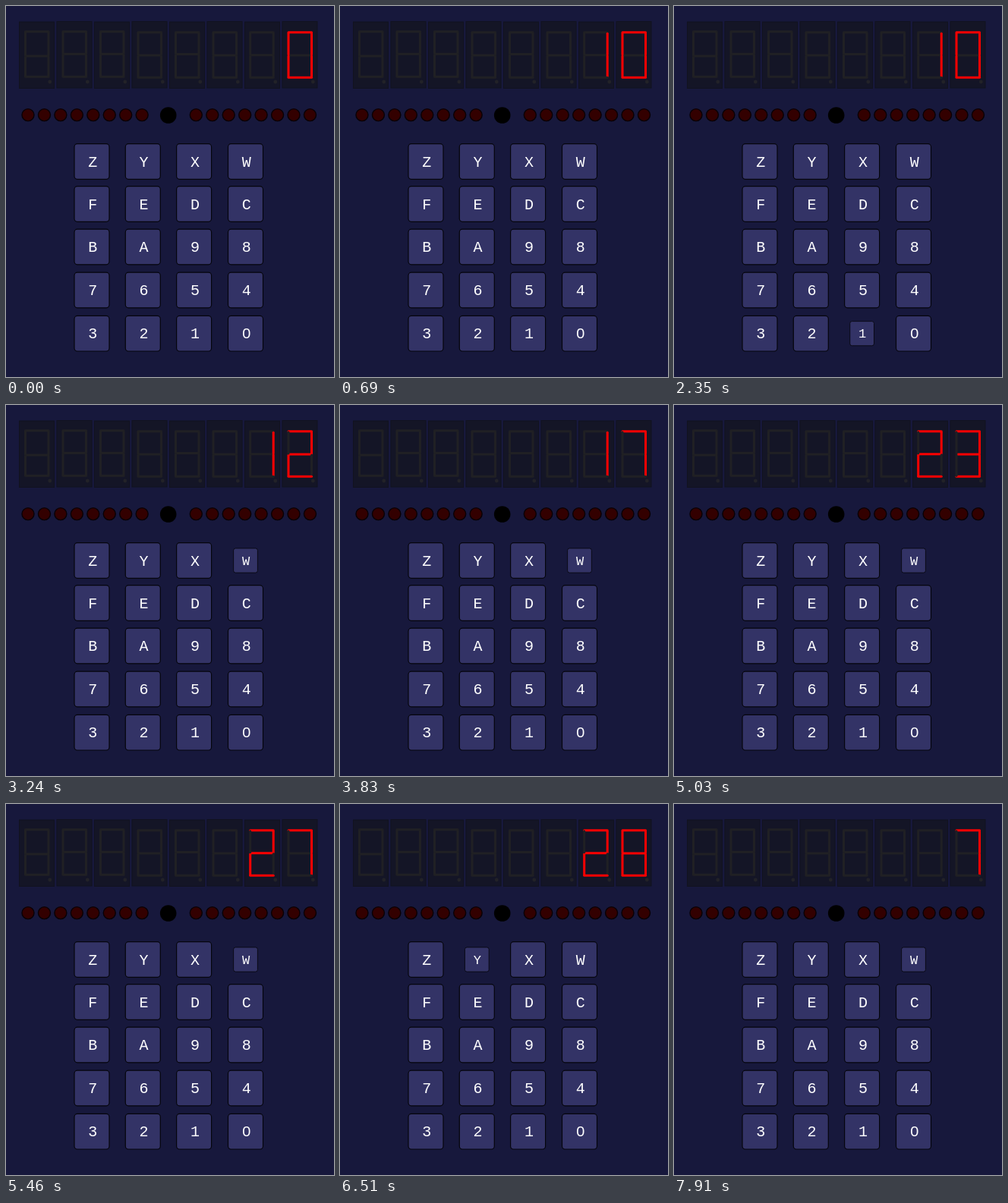
An HTML page for the animation above (7990 ms loop, 432 by 489 pixels).

```html
<!DOCTYPE html>
<html lang="en">
<head>
<meta charset="utf-8">
<title>Keypad adder</title>
<style>
  html, body { margin: 0; width: 100%; height: 100%; overflow: hidden; background: #17183c; }
  svg { display: block; width: 432px; height: 489px; }
  .panel { fill: #141526; stroke: #11121f; }
  .seg { stroke: #202024; stroke-width: 3; stroke-linecap: round; }
  .seg.on { stroke: #f00; }
  .dot { fill: #222228; }
  .led { fill: #300; stroke: #090005; stroke-width: 1.4; }
  .key rect { fill: #336; stroke: #05050c; stroke-width: 1.2; }
  .key text { fill: #fff; font: 20px "Courier New", "Liberation Mono", monospace; text-anchor: middle; }
  .key .hole { stroke: none; }
</style>
</head>
<body>
<svg id="stage" viewBox="0 0 432 489"></svg>
<script>
const LOOP = 7990;
const stage = document.getElementById('stage');

function add(parent, tag, attrs) {
  const el = document.createElementNS('http://www.w3.org/2000/svg', tag);
  for (const name in attrs) el.setAttribute(name, attrs[name]);
  return parent.appendChild(el);
}

// Segments a to g of each figure
const FIGURES = ['abcdef', 'bc', 'abged', 'abgcd', 'fgbc', 'afgcd', 'afgedc', 'abc', 'abcdefg', 'abcdfg'];

function makeDigit(i) {
  const x = 17.5 + i * 49.5;
  const dy = i < 3 ? -1 : 0;
  const l = x + 8 - (i === 6 ? 0.8 : 0), r = l + 30.5;
  const top = 34.8 + dy, bot = 94.3 + dy;
  const mid = [66, 63.2, 63.2, 65, 63.5, 65, 64.8, 65][i];
  add(stage, 'rect', { class: 'panel', x, y: i % 2 ? 20.5 : 21, width: 46, height: 87.5 });
  add(stage, 'circle', { class: 'dot', cx: x + 40.3, cy: 100, r: 2.4 });
  const lines = {
    g: [l + 1, mid, r - 1, mid],
    a: [l, top, r, top],
    b: [r, top + 1.5, r, mid - 1],
    c: [r, mid + 1, r, bot - 1.5],
    d: [l, bot, r, bot],
    e: [l, mid + 1, l, bot - 1],
    f: [l, top + 1, l, mid - 1]
  };
  const segs = {};
  for (const name in lines) {
    const [x1, y1, x2, y2] = lines[name];
    segs[name] = add(stage, 'line', { class: 'seg', x1, y1, x2, y2 });
  }
  return segs;
}

const digits = Array.from({ length: 8 }, (_, i) => makeDigit(i));

for (let i = 0; i < 8; i++)
  for (const x of [29, 250.3])
    add(stage, 'circle', { class: 'led', cx: x + i * 21.45, cy: 143.6, r: 8 });
add(stage, 'circle', { cx: 213.7, cy: 144, r: 10.8 });

const COLS = [113, 180.3, 247.6, 315.5];
const ROWS = [205, 261, 317.5, 374.5, 431.7];
const keys = {};

[...'ZYXWFEDCBA9876543210'].forEach((name, i) => {
  const x = COLS[i % 4], y = ROWS[i >> 2];
  const g = add(stage, 'g', { class: 'key' });
  const cap = add(g, 'rect', { x: x - 23, y: y - 23.3, width: 46, height: 46.6, rx: 4 });
  const label = add(g, 'g', {});
  add(label, 'text', { x: 0, y: 6 }).textContent = name;
  // Plain zero without its inner dot
  if (name === '0') add(label, 'rect', { class: 'hole', x: -1.7, y: -3, width: 3.4, height: 6 });
  keys[name] = { x, y, cap, label };
});

function drawKey({ x, y, cap, label }, down) {
  const s = down ? 0.69 : 1;
  cap.setAttribute('transform', `translate(${x} ${y}) scale(${s}) translate(${-x} ${-y})`);
  label.setAttribute('transform', `translate(${x + (down ? 0.6 : 1.3)} ${y + 0.6}) scale(${down ? 0.85 : 1})`);
}

// key, pressed, number appears, released, number
const presses = [
  ['1', 150, 280, 330, 1],
  ['0', 510, 640, 690, 10],
  ['Z', 1610, 1610, 1760, 10],
  ['1', 2350, 2450, 2500, 1]
];

// Repeated adding of one
const taps = [
  [2810, 2860, 2910],
  [3060, 3130, 3130], [3200, 3270, 3270], [3350, 3390, 3420], [3490, 3560, 3560],
  [3640, 3710, 3710], [3780, 3830, 3880],
  [3980, 4060, 4060], [4160, 4250, 4250], [4350, 4440, 4440], [4530, 4620, 4620],
  [4720, 4790, 4790], [4860, 4930, 4930], [5000, 5070, 5070], [5150, 5190, 5220],
  [5290, 5360, 5360], [5430, 5460, 5490],
  [5590, 5640, 5690]
];
taps.forEach((t, i) => presses.push(['W', ...t, 11 + i]));

presses.push(
  ['Y', 6510, 6510, 6690, 28],
  ['2', 7200, 7300, 7350, 2],
  ['1', 7480, 7580, 7630, 21],
  ['W', 7860, 7910, LOOP, 7]
);

let shown = '';

function draw(t) {
  let value = 0, held = '';
  for (const [key, down, change, up, number] of presses) {
    if (t >= change) value = number;
    if (t >= down && t < up) held = key;
  }
  const state = value + held;
  if (state === shown) return;
  shown = state;
  const text = String(value).padStart(8);
  digits.forEach((segs, i) => {
    const lit = text[i] === ' ' ? '' : FIGURES[text[i]];
    for (const name in segs) segs[name].classList.toggle('on', lit.includes(name));
  });
  for (const name in keys) drawKey(keys[name], name === held);
}

const start = performance.now();
function tick() {
  draw((performance.now() - start) % LOOP);
  requestAnimationFrame(tick);
}
tick();
</script>
</body>
</html>
```
